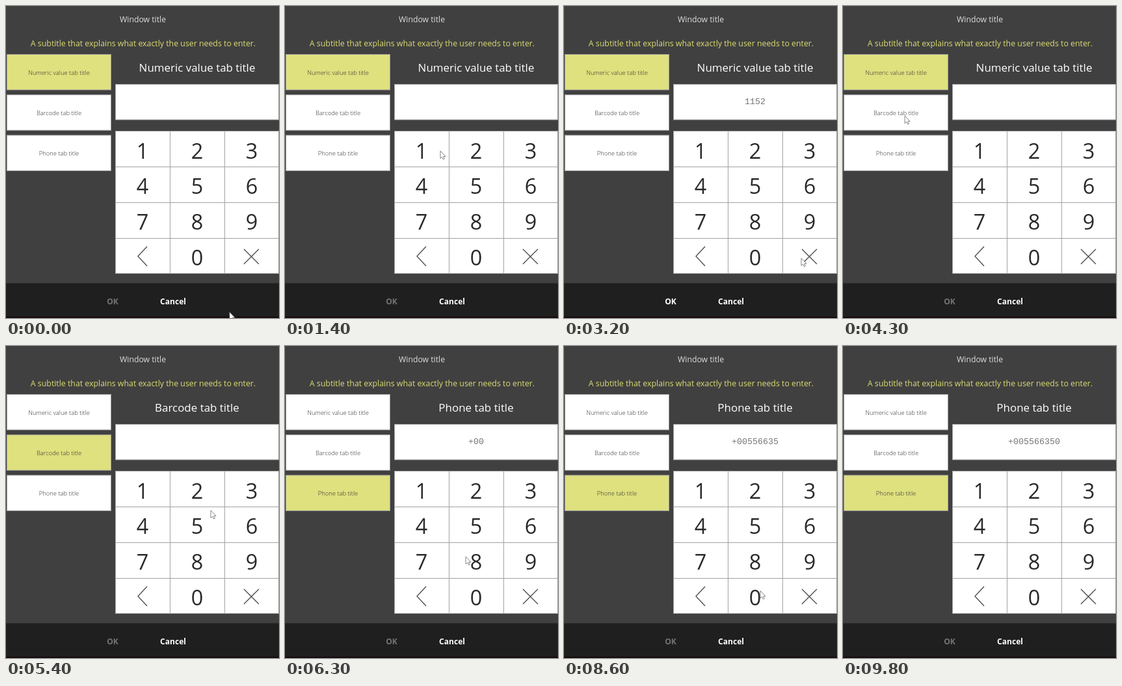
An HTML page that plays this animation: 420x480 px, repeating every 9.9 s.

```html
<!DOCTYPE html>
<html lang="en">
<head>
<meta charset="utf-8">
<title>Keypad dialog</title>
<style>
  html, body { margin: 0; width: 420px; height: 480px; overflow: hidden; background: #404040; }
  svg { display: block; }
  text { font-family: "Open Sans", "Noto Sans", sans-serif; text-anchor: middle; }
  .panel { fill: #fff; stroke: #a0a0a0; }
  .panel.active { fill: #dfe07e; }
  .tab { font-size: 9.4px; font-weight: 300; fill: #2c2c2c; }
  .digit { font-size: 32.5px; fill: #2a2a2a; }
  .icon { fill: none; stroke: #4a4a4a; stroke-width: 1.3; }
  .button { font-size: 12.1px; font-weight: 700; fill: #fff; }
  #value { font: 13.3px "Liberation Mono", monospace; fill: #757575; }
</style>
</head>
<body>
<svg id="stage" width="420" height="480" viewBox="0 0 420 480">
  <rect width="420" height="480" fill="#404040"/>
  <rect y="426.5" width="420" height="54" fill="#1f1f1f"/>
  <rect y="478" width="420" height="2" fill="#16090d"/>
  <text x="210.5" y="25" font-size="12.25" fill="#dcdcdc">Window title</text>
  <text x="211" y="62" font-size="12.35" fill="#d9dc72">A subtitle that explains what exactly the user needs to enter.</text>
  <text id="title" x="294" y="100.5" font-size="16.95" fill="#fff"></text>
  <rect class="panel" x="168.5" y="120.5" width="251" height="54.5"/>
  <text id="value" x="294" y="151"></text>
  <rect class="panel" x="168.5" y="192.5" width="251" height="219"/>
  <path d="M252.5 193V411M336.5 193V411M169 247.5H419M169 302.5H419M169 357.5H419" stroke="#a2a2a2"/>
  <path class="icon" d="M217 370L203 385L217 400M366 374L389 397M389 374L366 397"/>
  <text id="ok" class="button" x="164" y="459">OK</text>
  <text class="button" x="257" y="459">Cancel</text>
  <g id="parts"></g>
  <path id="cursor" d="M0 0V11.5L2.7 9.2L4.5 13L6.4 12.1L4.7 8.4H8Z" fill="#fff" stroke="#777" stroke-width=".9"/>
</svg>
<script>
const LOOP = 9900, TICK = 100, TRAVEL = 600;
const TABS = ["Numeric value tab title", "Barcode tab title", "Phone tab title"];
const PREFIX = ["", "", "+00"];
const KEYS = "123456789<0x";

// Pointer script: a key or tab name is clicked at that time, a point is only visited.
const SCRIPT = [
  [300, [344, 471]],
  [1500, "1"], [1700, "1"], [1900, "5"], [2400, "2"], [3400, "x"],
  [4600, TABS[1]], [5400, [315, 253]], [6000, TABS[2]], [6300, [278, 324]],
  [6600, "5"], [6800, "5"], [7200, "6"], [7500, "6"], [7800, "3"], [8200, "5"], [8700, "0"],
  [9400, [340, 484]]
];

const get = id => document.getElementById(id);

function add(name, attrs, text = "") {
  const el = document.createElementNS("http://www.w3.org/2000/svg", name);
  for (const key in attrs) el.setAttribute(key, attrs[key]);
  el.textContent = text;
  return get("parts").appendChild(el);
}

const tabBoxes = TABS.map((name, i) => {
  const y = 74.5 + 62.2 * i;
  const box = add("rect", { class: "panel", x: 1.5, y, width: 160, height: 54.5 });
  add("text", { class: "tab", x: 81.5, y: y + 31.2 }, name);
  return box;
});

[...KEYS].forEach((key, i) => {
  const x = 210 + 84 * (i % 3), y = 234.5 + 54.9 * Math.floor(i / 3);
  if (key >= "0" && key <= "9") add("text", { class: "digit", x, y }, key);
});

// Where the pointer stands to click; the hand leans towards the middle column.
function spot(target) {
  if (Array.isArray(target)) return target;
  const tab = TABS.indexOf(target), key = KEYS.indexOf(target);
  return tab >= 0 ? [95, 107 + 62 * tab] : [239 + 63 * (key % 3), 223 + 55 * Math.floor(key / 3)];
}

function pointerAt(t) {
  const next = SCRIPT.findIndex(step => step[0] > t);
  if (next === 0) return spot(SCRIPT[0][1]);
  if (next < 0) return spot(SCRIPT.at(-1)[1]);
  const [t0, from] = SCRIPT[next - 1], [t1, to] = SCRIPT[next];
  const u = Math.min(1, (t - t0) / Math.min(TRAVEL, t1 - t0));
  const ease = u * u * (3 - 2 * u);
  const a = spot(from), b = spot(to);
  return a.map((v, i) => v + (b[i] - v) * ease);
}

function stateAt(t) {
  let tab = 0, value = "";
  for (const [time, target] of SCRIPT) {
    if (time > t) break;
    if (Array.isArray(target)) continue;
    if (TABS.includes(target)) {
      tab = TABS.indexOf(target);
      value = PREFIX[tab];
    } else {
      value = target === "x" ? "" : value + target;
    }
  }
  return { tab, value };
}

function draw(t) {
  const { tab, value } = stateAt(t);
  tabBoxes.forEach((box, i) => box.classList.toggle("active", i === tab));
  get("title").textContent = TABS[tab];
  get("value").textContent = value;
  get("ok").setAttribute("fill-opacity", tab === 0 && value ? 1 : 0.38);
  get("cursor").setAttribute("transform", `translate(${pointerAt(t)})`);
}

const start = performance.now();
function loop() {
  const t = (performance.now() - start) % LOOP;
  draw(Math.floor(t / TICK) * TICK);
  requestAnimationFrame(loop);
}
loop();
</script>
</body>
</html>
```
